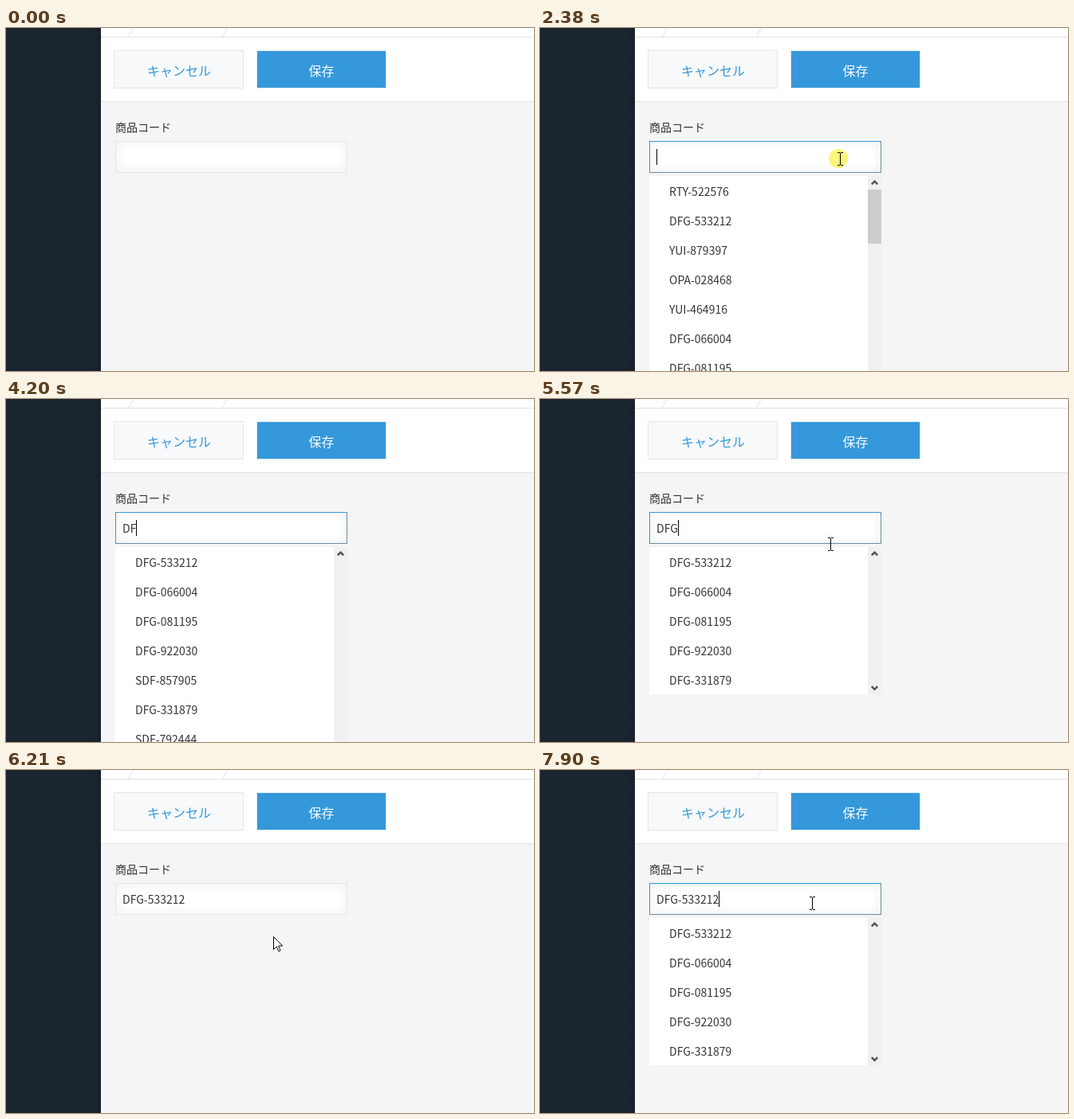
Recreate the animation shown at these times as an HTML page. Size 662 by 431 pixels, loop 8 s.

```html
<!DOCTYPE html>
<html lang="ja">
<head>
<meta charset="utf-8">
<style>
  html, body { margin: 0; width: 100%; height: 100%; overflow: hidden; background: #f5f5f5; }
  #field {
    position: absolute; left: 137px; top: 142px; width: 291px; height: 40px;
    box-sizing: border-box; background: #fff; border: 1px solid #e3e7e8;
    box-shadow: inset 4px 4px 12px #f5f5f5, inset -4px -4px 12px #f5f5f5;
  }
  #field.focus { border-color: #3498db #6c8ba3 #6c8ba3 #4f8fc0; }
  svg { position: absolute; left: 0; top: 0; }
  text { font: 14px "Noto Sans CJK JP", "Noto Sans CJK", "Noto Sans", sans-serif; fill: #333; }
  .button { font-size: 16px; text-anchor: middle; }
  .chevron { fill: none; stroke: #505050; stroke-width: 2.4; }
</style>
</head>
<body>
<div id="field"></div>
<svg width="662" height="431" viewBox="0 0 662 431">
  <defs>
    <linearGradient id="side">
      <stop offset=".88" stop-color="#1b252f"/>
      <stop offset="1" stop-color="#18202d"/>
    </linearGradient>
  </defs>

  <path d="M119 0H662V93H119z" fill="#fff"/>
  <path d="M119 11.5H662M119 92.5H662M159.5 0L153 11.5M277.5 0L271 11.5" fill="none" stroke="#e0e3e4"/>
  <rect width="119" height="431" fill="url(#side)"/>

  <rect x="135.5" y="28.5" width="162" height="47" fill="#f7f9fa" stroke="#e3e7e8"/>
  <rect x="314.5" y="28.5" width="162" height="47" fill="#3498db" stroke="#dfe8ee"/>
  <text class="button" x="217" y="60" style="fill:#3498db">キャンセル</text>
  <text class="button" x="395.5" y="60" style="fill:#fff">保存</text>
  <text x="137" y="130">商品コード</text>

  <g id="list">
    <rect id="panel" x="137" y="186" width="274" fill="#fff"/>
    <rect id="track" x="411" y="186" width="17" fill="#f0f0f0"/>
    <rect id="thumb" x="411" y="203" width="17" height="68" fill="#cdcdcd"/>
    <path class="chevron" d="M415.8 196.3l3.7-3.7 3.7 3.7"/>
    <path class="chevron" id="down" d="M415.8 361.2l3.7 3.7 3.7-3.7"/>
    <g id="rows"></g>
  </g>

  <text id="value" x="146" y="168"></text>
  <rect id="caret" y="152" width="1" height="20" fill="#000"/>

  <g id="pointer">
    <circle id="click" r="12" fill="#fff67c" style="mix-blend-mode:multiply"/>
    <path id="arrow" d="M.5.5v16l3.7-3.6 2.6 5.9 2.3-1-2.6-5.8h5.2z" fill="#fff" stroke="#000"/>
    <path id="beam" d="M-3 -7.5H0M1 -7.5H4M.5 -7V8M-3 8.5H0M1 8.5H4" fill="none" stroke="#000"/>
  </g>
</svg>
<script>
  const LOOP = 8000;
  const el = id => document.getElementById(id);
  const show = (id, on) => { el(id).style.display = on ? "" : "none"; };

  const lists = {
    all: ["RTY-522576", "DFG-533212", "YUI-879397", "OPA-028468", "YUI-464916", "DFG-066004", "DFG-081195"],
    some: ["DFG-533212", "DFG-066004", "DFG-081195", "DFG-922030", "SDF-857905", "DFG-331879", "SDF-792444"],
    few: ["DFG-533212", "DFG-066004", "DFG-081195", "DFG-922030", "DFG-331879"]
  };

  // start, list, field text, caret x (0 = hidden), focused
  const states = [
    [0, "", "", 0, false],
    [2380, "all", "", 146, true],
    [2910, "all", "", 0, true],
    [3460, "all", "", 146, true],
    [3790, "all", "D", 156, true],
    [3860, "some", "D", 156, true],
    [4200, "some", "DF", 163, true],
    [4540, "some", "DFG", 173, true],
    [4610, "few", "DFG", 173, true],
    [5070, "few", "DFG", 0, true],
    [5570, "few", "DFG", 173, true],
    [6100, "", "DFG-533212", 0, false],
    [6840, "few", "DFG-533212", 224, true],
    [7370, "few", "DFG-533212", 0, true],
    [7900, "few", "DFG-533212", 224, true]
  ];

  // start, end, steps, from, to
  const moves = [
    [1512, 2120, 9, [597, 241], [376, 164]],
    [5570, 5780, 3, [364, 182], [335, 209]],
    [6220, 6630, 6, [335, 209], [341, 167]]
  ];

  const clicks = [[2300, 2450], [6030, 6210], [6840, 6940]];
  const within = (t, [a, b]) => t >= a && t < b;

  function pointerAt(t) {
    const [start, end, steps, from, to] = moves.filter(m => t >= m[0]).pop() || moves[0];
    const raw = Math.min(1, Math.max(0, (t - start) / (end - start)));
    const p = Math.floor(raw * steps + 1e-6) / steps;
    const eased = p * p * (3 - 2 * p);
    return from.map((v, i) => Math.round(v + (to[i] - v) * eased));
  }

  function drawList(name) {
    show("list", name);
    if (!name) return;
    const height = name === "few" ? 185 : 260;
    el("panel").setAttribute("height", height);
    el("track").setAttribute("height", height);
    show("thumb", name === "all");
    show("down", name === "few");
    el("rows").innerHTML = lists[name]
      .map((code, i) => `<text x="162" y="${211 + 37 * i}">${code}</text>`).join("");
  }

  let current;
  function drawState(state) {
    if (state === current) return;
    current = state;
    const [, list, text, caret, focused] = state;
    drawList(list);
    el("value").textContent = text;
    el("caret").setAttribute("x", caret);
    show("caret", caret);
    el("field").classList.toggle("focus", focused);
  }

  function drawPointer(t) {
    const [x, y] = pointerAt(t);
    const inField = x >= 137 && x < 428 && y >= 142 && y <= 182;
    show("pointer", within(t, [1500, 3790]) || t >= 5570);
    show("beam", inField);
    show("arrow", !inField);
    show("click", clicks.some(c => within(t, c)));
    el("click").setAttribute("cx", inField ? -2 : 0);
    el("pointer").setAttribute("transform", `translate(${x} ${y})`);
  }

  const begin = performance.now();
  function frame(now) {
    const t = Math.max(0, now - begin) % LOOP;
    drawState(states.filter(s => t >= s[0]).pop());
    drawPointer(t);
    requestAnimationFrame(frame);
  }
  frame(begin);
</script>
</body>
</html>
```
